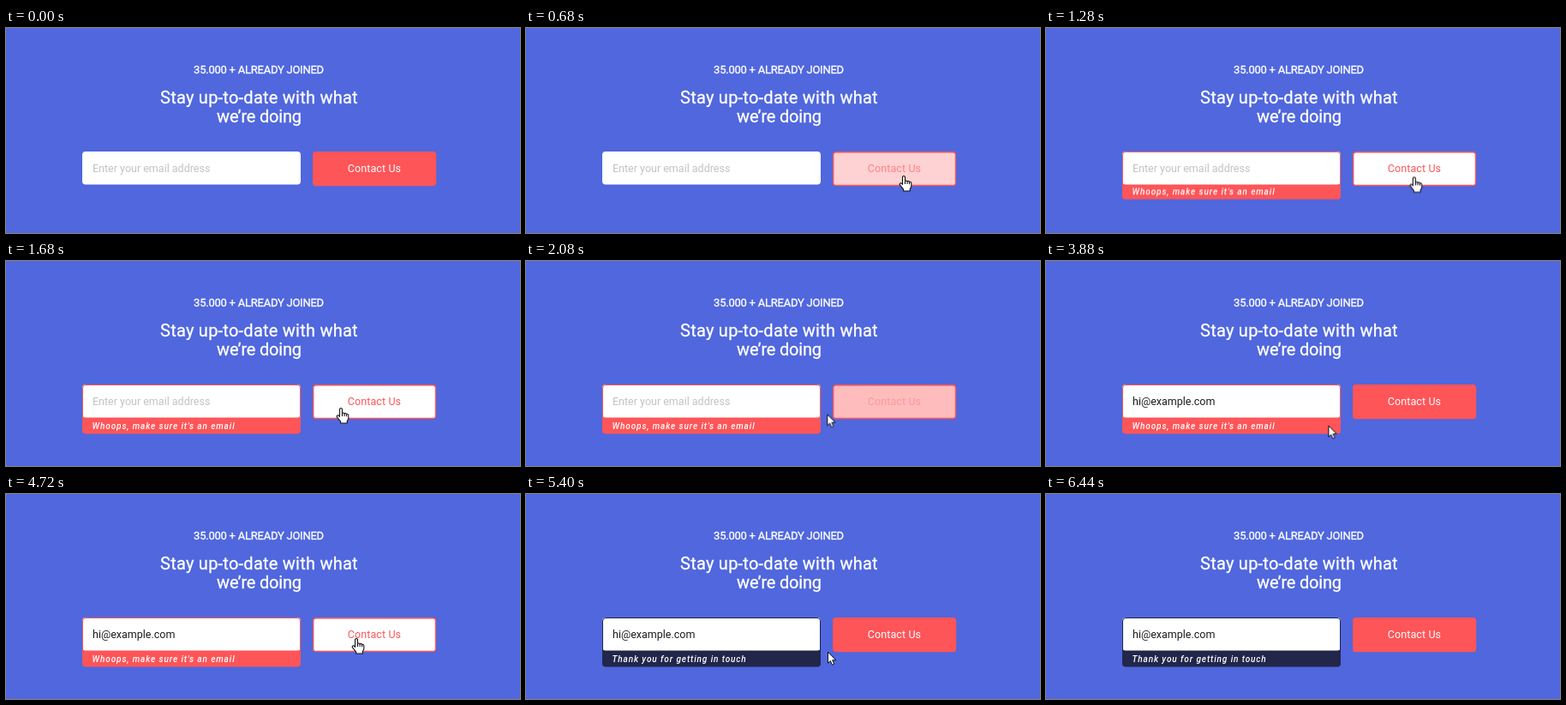
These frames come from a looping animation (600x239 px, 6.52 s). An HTML page:

```html
<!DOCTYPE html>
<html lang="en">
<head>
<meta charset="utf-8">
<title>Newsletter sign-up</title>
<style>
  :root { --red: #fd5558; --loop: 6520ms; }
  html, body { margin: 0; height: 100%; overflow: hidden; background: #5067dd; }
  svg { display: block; width: 100vw; height: 100vh; }
  text { font: 12.5px Roboto, Inter, sans-serif; fill: #fff; }
  .middle { text-anchor: middle; }
  .heading { stroke: #fff; stroke-width: .3px; }
  #joined { font-size: 13px; letter-spacing: -.24px; }
  .title { font-size: 20px; }
  #hint { fill: #c3c3c5; }
  #typed { fill: #1a1a20; }
  #note text { font-size: 10px; font-weight: 500; font-style: italic; letter-spacing: .9px; }

  #cursor, #cursor g, #button, #label, #note, #bar, #frame, #error, #thanks {
    animation: var(--loop) linear infinite;
  }
  #cursor { animation-name: move; }
  #cursor g { stroke-linejoin: round; stroke-linecap: round; animation-timing-function: step-end; }
  #cursor #arrow { animation-name: arrow; }
  #cursor #hand { animation-name: hand; }
  #cursor #beam { animation-name: beam; }
  #button { stroke: var(--red); stroke-width: 1.4; animation-name: fill-button; }
  #label { letter-spacing: .1px; animation-name: fill-label; }
  #note { animation-name: slide; }
  #bar { animation-name: tint; }
  #frame { fill: none; animation-name: outline; }
  #error { animation-name: leave; }
  #thanks { animation-name: arrive; }

  @keyframes move {
    0% { transform: translate(612px, 250px); animation-timing-function: ease-out; }
    10.43%, 15.34% { transform: translate(441px, 172px); }
    21.47% { transform: translate(425px, 174px); }
    25.77% { transform: translate(391px, 171px); }
    30.67% { transform: translate(354px, 186px); }
    32.52% { transform: translate(350px, 175px); }
    38.34% { transform: translate(315px, 172px); }
    45.4%, 55.21% { transform: translate(309.5px, 173.5px); }
    60.74% { transform: translate(335px, 197px); }
    63.19% { transform: translate(346px, 184px); }
    69.02% { transform: translate(398px, 172px); }
    72.39%, 74.39% { transform: translate(409px, 168px); }
    77.91% { transform: translate(398px, 208px); }
    80.52% { transform: translate(368px, 202px); }
    82.82%, 84.66% { transform: translate(352px, 184px); }
    86.66% { transform: translate(354px, 140px); }
    93.56%, 100% { transform: translate(380px, -25px); }
  }
  @keyframes arrow {
    0%, 30.1%, 57.5%, 75.8% { opacity: 1; }
    7.06%, 33.6%, 64.5% { opacity: 0; }
    100% { opacity: 1; }
  }
  @keyframes hand {
    0%, 30.1%, 75.8%, 100% { opacity: 0; }
    7.06%, 64.5% { opacity: 1; }
  }
  @keyframes beam {
    0%, 57.5%, 100% { opacity: 0; }
    33.6% { opacity: 1; }
  }
  @keyframes fill-button {
    0%, 7.06%, 34.7%, 64.5%, 80.4%, 100% { fill: #fd5558; }
    11.66%, 30.1%, 69.1%, 75.8% { fill: #fff; }
  }
  @keyframes fill-label {
    0%, 7.06%, 34.7%, 64.5%, 80.4%, 100% { fill: #fff; }
    11.66%, 30.1%, 69.1%, 75.8% { fill: #fd5558; }
  }
  @keyframes slide {
    0%, 15.8% { transform: translateY(-20px); opacity: 0; }
    15.81% { transform: translateY(-20px); opacity: 1; }
    20%, 100% { transform: none; opacity: 1; }
  }
  @keyframes tint {
    0%, 74.4% { fill: #fd5558; }
    78%, 100% { fill: #22264a; }
  }
  @keyframes outline {
    0%, 15.8% { stroke: #fd555800; }
    20%, 74.4% { stroke: #fd5558; }
    78%, 100% { stroke: #22264a; }
  }
  @keyframes leave { 0%, 74.4% { opacity: 1; } 76.2%, 100% { opacity: 0; } }
  @keyframes arrive { 0%, 76.2% { opacity: 0; } 78%, 100% { opacity: 1; } }
</style>
</head>
<body>
<svg viewBox="0 0 600 239">
  <text id="joined" class="heading middle" x="295" y="52.8">35.000 + ALREADY JOINED</text>
  <text class="heading title middle" x="295.5" y="88.4" letter-spacing=".24">Stay up-to-date with what</text>
  <text class="heading title middle" x="295.5" y="110.2" letter-spacing="-.18">we’re doing</text>

  <g id="note">
    <rect id="bar" x="89" y="164" width="255" height="37.5" rx="4"/>
    <text id="error" x="100.5" y="195.7">Whoops, make sure it's an email</text>
    <text id="thanks" x="100.5" y="195.7">Thank you for getting in touch</text>
  </g>
  <rect x="89" y="144" width="255" height="38.5" rx="4" fill="#fff"/>
  <path id="frame" d="M89.5 182.5V148q0-3.5 3.5-3.5H340q3.5 0 3.5 3.5V182.5"/>
  <text id="hint" x="101" y="167.8">Enter your email address</text>
  <text id="typed" x="101" y="167.8"></text>

  <rect id="button" x="358.7" y="144.7" width="142.8" height="38.8" rx="3.3"/>
  <text id="label" class="middle" x="430" y="168.4">Contact Us</text>

  <g id="cursor">
    <g id="arrow" fill="#fff" stroke="#111">
      <path d="M.5 .5V13.2L3.4 10.5 5.4 15.2 7.7 14.2 5.7 9.7H9.5Z"/>
    </g>
    <g id="hand" fill="#fff" stroke="#111" stroke-width="1.1">
      <path d="M-1.5 1.6Q0-.6 1.5 1.6V6.4q1.6-.9 2.6.3 1.5-.6 2.5.6 1.9-.3 2.2 1.2V13L7.3 15.6V18H-.4V16.2L-4.8 10.6Q-5 8.4-3 8.9L-1.5 10.4Z"/>
      <path d="M1.5 6.4V9.4M4.1 6.7V9.5M6.6 7.3V9.8" fill="none"/>
    </g>
    <g id="beam" fill="none" stroke="#222" stroke-width="1.1">
      <path d="M-3-6H-1.2L0-5.2 1.2-6H3M0-5.2V5.2M-3 6H-1.2L0 5.2 1.2 6H3"/>
    </g>
  </g>
</svg>
<script>
  const LOOP = 6520, TYPE_START = 3150, KEY_GAP = 50;
  const address = "hi@example.com";
  const byId = id => document.getElementById(id);
  const hint = byId("hint"), typed = byId("typed");
  // Share the cursor's clock so typing stays in step with the keyframes.
  const clock = byId("cursor").getAnimations()[0];

  function draw() {
    const t = (clock.currentTime || 0) % LOOP;
    const count = Math.max(0, Math.floor((t - TYPE_START) / KEY_GAP) + 1);
    typed.textContent = address.slice(0, count);
    hint.style.visibility = count ? "hidden" : "visible";
    requestAnimationFrame(draw);
  }
  draw();
</script>
</body>
</html>
```
